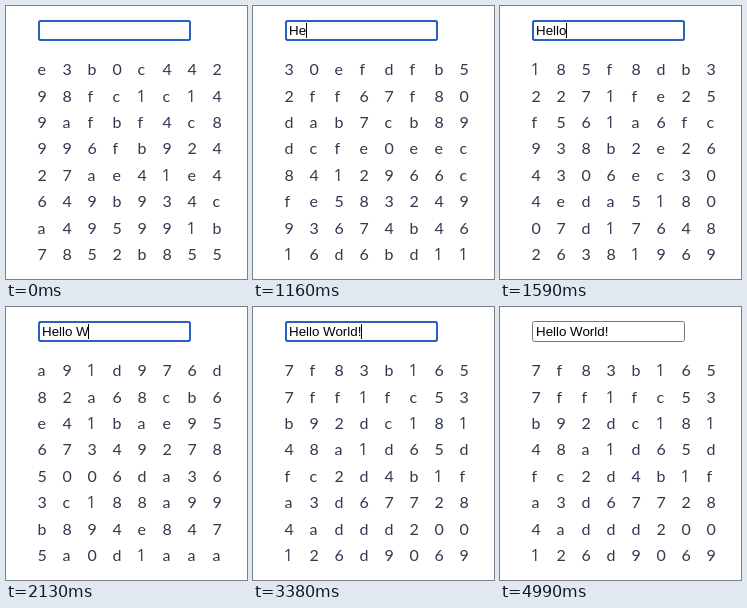
Recreate the animation shown at these times as an HTML page. Size 241 by 273 pixels, loop 5.08 s.

```html
<!DOCTYPE html>
<html lang="en">
<head>
<meta charset="utf-8">
<title>SHA-256 while typing</title>
<style>
  html, body { margin: 0; width: 100%; height: 100%; overflow: hidden; background: #fff; }
  svg { display: block; width: 241px; height: 273px; }
  .input { font: 13.333px "Liberation Sans", Arial, sans-serif; fill: #000; white-space: pre; }
  .hex { font: 16px Lato, "Open Sans", sans-serif; fill: #2f3a4f; }
  .hex .one { font-family: "Open Sans", sans-serif; }
  .box { fill: #fff; stroke: #767676; stroke-width: 1; }
  .ring { fill: none; stroke: #2861c4; stroke-width: 2; }
</style>
</head>
<body>
<svg viewBox="0 0 241 273">
  <rect class="box" x="32.5" y="14.5" width="152" height="20" rx="2"/>
  <rect class="ring" id="ring" x="33" y="15" width="151" height="19" rx="2"/>
  <text class="input" id="typed" x="36" y="29" xml:space="preserve"></text>
  <rect id="caret" x="36" y="17" width="1" height="15"/>
  <g class="hex" id="grid"></g>
</svg>
<script>
const LOOP = 5080, LEFT = 36;
const MESSAGE = "Hello World!";
const BLUR_AT = 4990;

// [time, letters in the field, letters hashed]
const TYPING = [
  [0, 0, 0], [890, 1, 1], [1160, 2, 2], [1240, 3, 2], [1330, 3, 3],
  [1500, 4, 4], [1590, 5, 5], [1860, 6, 6], [2130, 7, 7], [2490, 8, 8],
  [2940, 9, 9], [3020, 10, 10], [3110, 11, 11], [3380, 12, 12]
];
// [time, caret visible]
const BLINK = [[0, 0], [80, 1], [620, 0], [890, 1], [3830, 0], [4360, 1], [4810, 0]];

const $ = id => document.getElementById(id);
const at = (steps, t) => steps.filter(s => s[0] <= t).pop();
const rotr = (x, n) => (x >>> n) | (x << (32 - n));

const primes = [];
for (let n = 2; primes.length < 64; n++) {
  if (primes.every(p => n % p)) primes.push(n);
}
const fraction = x => ((x - Math.floor(x)) * 2 ** 32) | 0;
const K = primes.map(p => fraction(Math.cbrt(p)));
const H0 = primes.slice(0, 8).map(p => fraction(Math.sqrt(p)));

// SHA-256 of a short ASCII string (one block)
function sha256(text) {
  const w = new Array(64).fill(0);
  [...text + "\x80"].forEach((c, i) => {
    w[i >> 2] |= c.charCodeAt(0) << (24 - 8 * (i % 4));
  });
  w[15] = text.length * 8;
  for (let i = 16; i < 64; i++) {
    const x = w[i - 15], y = w[i - 2];
    const s0 = rotr(x, 7) ^ rotr(x, 18) ^ (x >>> 3);
    const s1 = rotr(y, 17) ^ rotr(y, 19) ^ (y >>> 10);
    w[i] = (w[i - 16] + s0 + w[i - 7] + s1) | 0;
  }
  let [a, b, c, d, e, f, g, h] = H0;
  for (let i = 0; i < 64; i++) {
    const s1 = rotr(e, 6) ^ rotr(e, 11) ^ rotr(e, 25);
    const t1 = (h + s1 + ((e & f) ^ (~e & g)) + K[i] + w[i]) | 0;
    const s0 = rotr(a, 2) ^ rotr(a, 13) ^ rotr(a, 22);
    const t2 = (s0 + ((a & b) ^ (a & c) ^ (b & c))) | 0;
    [a, b, c, d, e, f, g, h] = [(t1 + t2) | 0, a, b, c, (d + t1) | 0, e, f, g];
  }
  return [a, b, c, d, e, f, g, h]
    .map((v, i) => ((v + H0[i]) >>> 0).toString(16).padStart(8, "0"))
    .join("");
}

const hashes = Array.from({ length: MESSAGE.length + 1 }, (_, n) => sha256(MESSAGE.slice(0, n)));

const cells = Array.from({ length: 64 }, (_, i) => {
  const cell = document.createElementNS("http://www.w3.org/2000/svg", "text");
  cell.setAttribute("y", Math.round(69.25 + 26.4 * (i >> 3)));
  $("grid").append(cell);
  return cell;
});

let shownText = -1, shownHash = -1;

function showText(n) {
  if (n === shownText) return;
  shownText = n;
  $("typed").textContent = MESSAGE.slice(0, n);
  const width = n ? $("typed").getComputedTextLength() : 0;
  $("caret").setAttribute("x", Math.floor(LEFT + width));
}

function showHash(n) {
  if (n === shownHash) return;
  shownHash = n;
  cells.forEach((cell, i) => {
    const c = hashes[n][i];
    const one = c === "1";
    cell.textContent = c;
    cell.setAttribute("class", one ? "one" : "");
    cell.setAttribute("x", 31.4 + 25 * (i % 8) - (one ? 0.6 : 0));
  });
}

function draw(now) {
  const t = now % LOOP;
  const [, letters, hashed] = at(TYPING, t);
  showText(letters);
  showHash(hashed);
  $("caret").style.opacity = at(BLINK, t)[1];
  $("ring").style.opacity = t < BLUR_AT ? 1 : 0;
}

const start = performance.now();
function tick() {
  draw(performance.now() - start);
  requestAnimationFrame(tick);
}
tick();
</script>
</body>
</html>
```
